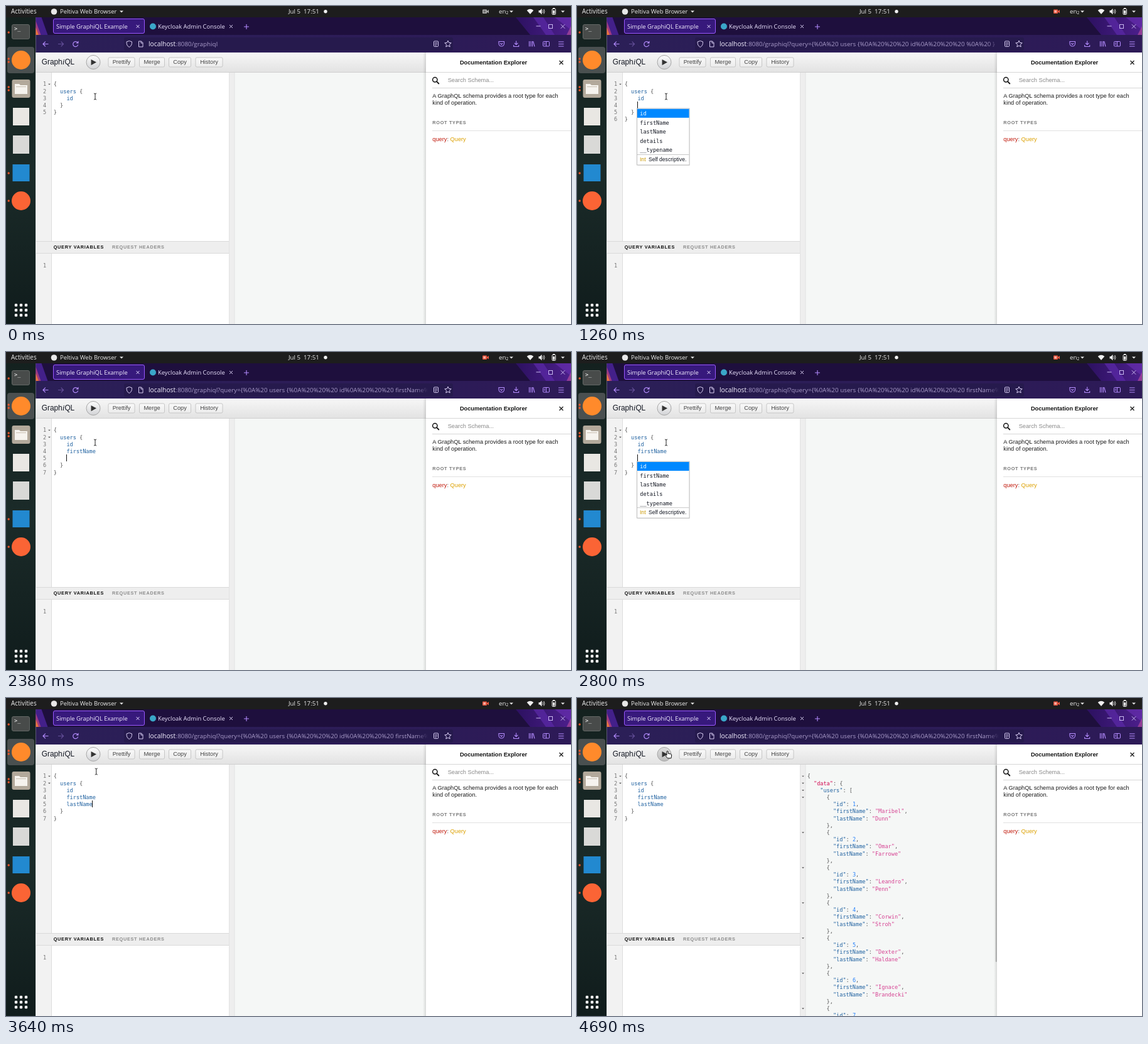
Write an HTML page that moves like this. It is 900 by 506 pixels and loops after 4760 ms.

```html
<!DOCTYPE html>
<html lang="en">
<head>
<meta charset="utf-8">
<title>GraphiQL</title>
<style>
html, body { margin: 0; width: 100%; height: 100%; overflow: hidden; background: #fff; }
svg { display: block; width: 900px; height: 506px; }
text { white-space: pre; }
.ui { font-family: "Open Sans", "Noto Sans", sans-serif; }
.web { font-family: "Liberation Sans", Arial, sans-serif; }
.code { font-family: "DejaVu Sans Mono", monospace; font-size: 8.57px; }
</style>
</head>
<body>
<svg id="stage" viewBox="0 0 900 506" xmlns="http://www.w3.org/2000/svg">
<defs>
  <linearGradient id="dock" x2="0" y2="1"><stop stop-color="#14211f"/><stop offset=".5" stop-color="#1b2b29"/><stop offset="1" stop-color="#101c1c"/></linearGradient>
  <linearGradient id="nav"><stop stop-color="#2b1f57"/><stop offset="1" stop-color="#2d1a57"/></linearGradient>
  <linearGradient id="glow"><stop stop-color="#2c1160"/><stop offset="1" stop-color="#4c1f8c"/></linearGradient>
  <linearGradient id="bar" x2="0" y2="1"><stop stop-color="#f7f7f7"/><stop offset="1" stop-color="#e2e2e2"/></linearGradient>
  <linearGradient id="btn" x2="0" y2="1"><stop stop-color="#f9f9f9"/><stop offset="1" stop-color="#ececec"/></linearGradient>
  <linearGradient id="run" x2="0" y2="1"><stop stop-color="#fdfdfd"/><stop offset="1" stop-color="#d2d3d6"/></linearGradient>
  <linearGradient id="runDown" x2="0" y2="1"><stop stop-color="#dedede"/><stop offset="1" stop-color="#bdbdbd"/></linearGradient>
  <linearGradient id="shade"><stop stop-color="#000" stop-opacity="0"/><stop offset="1" stop-color="#000" stop-opacity=".12"/></linearGradient>
  <linearGradient id="fade"><stop stop-color="#261a4d" stop-opacity="0"/><stop offset="1" stop-color="#261a4d"/></linearGradient>
  <clipPath id="urlClip"><rect x="220" y="48" width="452" height="24"/></clipPath>
</defs>
<g id="fixed"></g>
<g id="live"></g>
</svg>
<script>
const LOOP = 4760, STEP = 70, LINE = 11.2, CH = 5.16;
const $ = id => document.getElementById(id);

const rect = (x, y, w, h, fill, more = '') =>
  `<rect x="${x}" y="${y}" width="${w}" height="${h}" fill="${fill}" ${more}/>`;
const circle = (x, y, r, fill, more = '') =>
  `<circle cx="${x}" cy="${y}" r="${r}" fill="${fill}" ${more}/>`;
const fillPath = (d, fill, more = '') => `<path d="${d}" fill="${fill}" ${more}/>`;
const stroke = (d, color, w = 1, more = '') =>
  `<path d="${d}" fill="none" stroke="${color}" stroke-width="${w}" ${more}/>`;
const text = (cls, x, y, size, fill, s, more = '') =>
  `<text class="${cls}" x="${x}" y="${y}" font-size="${size}" fill="${fill}" ${more}>${s}</text>`;
const ui = (...a) => text('ui', ...a);
const web = (...a) => text('web', ...a);
const cross = (x, y, r, color, w) =>
  stroke(`M${x - r} ${y - r}l${2 * r} ${2 * r}m0 ${-2 * r}l${-2 * r} ${2 * r}`, color, w);
const down = (x, y, r, fill) => fillPath(`M${x - r} ${y - r / 2}h${2 * r}l${-r} ${r}z`, fill);

const row = i => 127.3 + LINE * i;
const fold = (x, i) => down(x, row(i) - 2.7, 1.9, '#555');

// Splits a line of code into coloured spans.
function code(x, i, line) {
  const spans = line.replace(/"data"|"\w+"(?=:)|"\w+"|\d+|[A-Za-z_]\w*|[^\w"]+/g, s => {
    const color = s === '"data"' ? '#d2054e'
      : /^"/.test(s) ? '#1f61a0'
      : /^\d/.test(s) ? '#2882f9'
      : /^\w/.test(s) ? '#1f61a0' : '#555';
    const value = /^"/.test(s) && !line.trim().startsWith(s);
    return `<tspan fill="${value ? '#d64292' : color}">${s}</tspan>`;
  });
  return `<text class="code" x="${x}" y="${row(i)}">${spans}</text>`;
}

function topBar() {
  let s = rect(0, 0, 900, 18, '#1d1d1d');
  s += ui(8, 12.4, 9.9, '#eee', 'Activities');
  s += circle(76.5, 9, 4.8, '#e8e8e8');
  s += ui(86, 12.4, 9.5, '#eee', 'Peltiva Web Browser') + down(184, 9, 3, '#e8e8e8');
  s += ui(450, 12.4, 9.7, '#eee', 'Jul 5  17:51') + circle(509, 8.7, 2.7, '#f2f2f2');
  s += ui(785, 12.4, 9.8, '#eee', 'en<tspan font-size="6.5" dy="1">2</tspan>');
  s += down(805, 9, 3, '#e8e8e8') + down(887, 9, 3, '#e8e8e8');
  s += fillPath('M835 13L829.7 7Q835 2.6 840.3 7z', '#f0f0f0');
  s += fillPath('M848.5 7h2l3-3v9.5l-3-3h-2z', '#f0f0f0');
  s += stroke('M855 6.5q1.5 2.2 0 4.5M856.7 5q2.6 3.7 0 7.5', '#ddd');
  s += rect(870, 4.5, 5.5, 9, 'none', 'rx="1" stroke="#f0f0f0"') + rect(871.2, 3, 3, 1.5, '#f0f0f0');
  s += rect(871.2, 7, 3, 5.5, '#f0f0f0');
  return s;
}

function dock() {
  let s = rect(0, 18, 47.5, 488, 'url(#dock)');
  s += rect(2, 65, 43, 42, '#4a5050', 'rx="4"');
  s += rect(9.5, 29.5, 28, 23, '#484b4a', 'rx="2.5" stroke="#636765"');
  s += text('code', 13, 38.5, 8, '#fff', '&gt;_');
  s += circle(24, 86, 15, '#ff8a2b');
  s += rect(9.5, 117, 29, 29, '#b3a99b', 'rx="3"');
  s += fillPath('M14 124h7l2 2h11v14h-20z', '#f6f3ee') + stroke('M16 128.5h16', '#c9bfb2');
  s += rect(11, 162, 26, 28, '#e9e7e3');
  s += rect(11, 206, 26, 29, '#d9d9d7');
  s += rect(10.5, 252, 27, 27, '#2289d0');
  s += circle(24, 310, 15, '#fb6435');
  for (const y of [42, 84, 89, 129, 134, 266, 310]) s += circle(4.2, y, 1.7, '#e8542a');
  for (let i = 0; i < 9; i++)
    s += rect(13.8 + i % 3 * 8, 473.8 + (i / 3 | 0) * 8, 4.4, 4.4, '#f2f2f2', 'rx="1.2"');
  return s;
}

function browser() {
  const pale = '#c9b8f0', pink = '#b48cff';
  let s = rect(47.5, 18, 852.5, 28, '#1e0f3d');
  s += fillPath('M47.5 18h9l10 28h-19z', '#43208a') + fillPath('M47.5 24l8 22h-8z', '#a03c80');
  s += fillPath('M47.5 34l4.5 12h-4.5z', '#e8763c');
  s += fillPath('M812 18h88v28h-65z', 'url(#glow)');
  s += fillPath('M840 18h16l18 28h-14z', '#5c2aa8', 'opacity=".7"');
  s += fillPath('M874 18h26v20z', '#6b30b4', 'opacity=".6"');
  s += fillPath('M900 32v14h-7z', '#b04a9c', 'opacity=".7"');
  s += rect(75.5, 20.5, 145, 23, '#37197c', 'rx="2.5" stroke="#9a59ff"');
  s += ui(80, 36.3, 9.4, '#f4efff', 'Simple GraphiQL Example') + cross(210, 32.5, 2.4, '#e6dcff', 1);
  s += circle(234, 32.5, 5, '#3aa6c8');
  s += ui(242, 36.3, 9.4, '#ece4ff', 'Keycloak Admin Console') + cross(358.5, 32.5, 2.4, '#e6dcff', 1);
  s += stroke('M379 33h8m-4-4v8', pink, 1.1);
  s += stroke('M844.5 32h7', pale) + rect(864.5, 29.5, 6, 6, 'none', `stroke="${pale}"`);
  s += cross(887, 32.5, 3.2, pale, 1);

  s += rect(47.5, 46, 852.5, 28, 'url(#nav)') + rect(188, 50, 524, 21, '#261a4d', 'rx="3"');
  s += stroke('M67.5 60.5h-8.5m3.8-3.8l-3.8 3.8 3.8 3.8', pink, 1.2);
  s += stroke('M83 60.5h8.5m-3.8-3.8l3.8 3.8-3.8 3.8', '#65509a', 1.2);
  s += stroke('M114 58.3a4 4 0 1 0 .7 3.3', pink, 1.2) + fillPath('M115.5 55.5v4h-4z', pink);
  s += stroke('M196.3 55.5l4.2 1.4c.3 4-1 7-4.2 8.6-3.2-1.6-4.5-4.6-4.2-8.6z', '#d8cdf3');
  s += stroke('M211.5 56h4l2.5 2.5v6.5h-6.5zM215 56v3h3', '#d8cdf3');
  s += rect(681.5, 56, 7, 8.5, 'none', 'rx="1" stroke="#d8cdf3"') + stroke('M683 58.5h4m-4 2h4m-4 2h3', '#d8cdf3', .8);
  s += stroke('M704 55l1.5 3.4 3.7.4-2.8 2.5.8 3.7-3.2-1.9-3.2 1.9.8-3.7-2.8-2.5 3.7-.4z', '#d8cdf3');
  s += stroke('M785 56.5h8.5v3.3a4.25 4.25 0 0 1-8.5 0zM787.2 59.2l2 2 2-2', pink, 1.1);
  s += stroke('M812.7 55.5v6m-2.8-2.7l2.8 2.7 2.8-2.7M808.7 62v2.5h8V62', pink, 1.1);
  s += stroke('M833.5 56v8.5m2.5-8.5v8.5m2.5-8.5v8.5m1.2-8.3l2.3 8.3', pink, 1.1);
  s += rect(855.5, 56.5, 10, 7.5, 'none', `rx="1" stroke="${pink}"`) + stroke('M860.5 56.5v7.5m-3.5-5h2m-2 2h2', pink);
  s += stroke('M880 57h8.5m-8.5 3.5h8.5m-8.5 3.5h8.5', pink, 1.1);
  return s;
}

function page() {
  const edge = '#dadada';
  let s = rect(47.5, 74, 852.5, 432, '#fff');
  s += rect(364, 106, 305, 400, '#f5f7f6') + rect(355, 106, 9, 400, '#eee');
  s += stroke('M355.5 106v400M364 106v400', '#e2e2e2');
  s += rect(47.5, 106, 25.5, 400, '#f2f2f2') + stroke('M72.5 106v400', '#ddd');
  s += rect(47.5, 74, 621.5, 32, 'url(#bar)') + stroke('M47.5 105.5h621.5', '#d0d0d0');
  s += web(56.7, 93.3, 11.9, '#141823', 'Graph<tspan font-style="italic" font-family="Liberation Serif, serif" font-size="13">i</tspan>QL');
  [['Prettify', 163, 42], ['Merge', 212.5, 40], ['Copy', 259.5, 35], ['History', 302, 43]].forEach(([label, x, w]) => {
    s += rect(x, 82, w, 15, 'url(#btn)', 'rx="2" stroke="#c6c6c6"');
    s += web(x + w / 2, 92, 9.24, '#444', label, 'text-anchor="middle"');
  });
  s += rect(47.5, 374, 307.5, 20, '#eee') + stroke('M47.5 374.5h307.5M47.5 393.5h307.5', edge);
  s += web(75.7, 386.2, 7.3, '#111', 'QUERY VARIABLES', 'font-weight="bold" letter-spacing=".74"');
  s += web(169, 386.2, 7.3, '#8c8c8c', 'REQUEST HEADERS', 'font-weight="bold" letter-spacing=".7"');
  s += text('code', 59, 415.9, 8.57, '#777', '1');
  return s;
}

function docs() {
  let s = rect(664, 74, 5, 432, 'url(#shade)') + rect(669, 74, 231, 432, '#fff');
  s += stroke('M669 105.5h231M679 130.5h221', '#d6d6d6') + stroke('M679 198.5h221', '#e0e0e0');
  s += web(776.5, 93.2, 9.24, '#141414', 'Documentation Explorer', 'font-weight="bold" text-anchor="middle"');
  s += cross(884.5, 90, 3, '#222', 1.4);
  s += circle(683.3, 117.3, 3.7, 'none', 'stroke="#111" stroke-width="1.5"') + stroke('M686 120.2l3.8 3.8', '#111', 1.8);
  s += web(703.7, 121.3, 9.24, '#8a8a8a', 'Search Schema...');
  s += web(679.3, 146, 9.24, '#1c1c1c', 'A GraphQL schema provides a root type for each');
  s += web(679.3, 157.2, 9.24, '#1c1c1c', 'kind of operation.');
  s += web(679.3, 188.2, 7.3, '#777', 'ROOT TYPES', 'font-weight="bold" letter-spacing=".7"');
  s += web(679.3, 215, 9.24, '#c0180a', 'query<tspan fill="#555">:</tspan> <tspan fill="#dca000">Query</tspan>');
  return s;
}

const people = ['Maribel Dunn', 'Omar Farrowe', 'Leandro Penn', 'Corwin Stroh',
  'Dexter Haldane', 'Ignace Brandecki', 'Tamsin Orrell'];

function results() {
  const lines = ['{', '  "data": {', '    "users": ['];
  people.forEach((p, i) => {
    const [first, last] = p.split(' ');
    lines.push('      {', `        "id": ${i + 1},`, `        "firstName": "${first}",`,
      `        "lastName": "${last}"`, '      },');
  });
  return lines.slice(0, 35).map((l, i) => code(366.7, i, l)).join('');
}
const resultLines = results();
const resultFolds = [0, 1, 2, ...people.map((_, i) => 3 + 5 * i)].map(i => fold(360, i)).join('');

const fields = ['id', 'firstName', 'lastName', 'details', '__typename'];

function popup(line, pick) {
  const x = 96, y = 163.5 + LINE * (line - 3), type = pick ? 'String' : 'Int';
  const w = pick ? 95.5 : 82.5, h = 89, rowH = 14.6;
  let s = rect(x + 1, y + 1.5, w, h, '#000', 'opacity=".1"') + rect(x - .5, y - .5, w + 1, h + 1, '#fff', 'stroke="#bbb"');
  s += rect(x, y + .3 + pick * rowH, w, 14, '#08f');
  fields.forEach((f, i) => {
    s += text('code', x + 4.3, y + 10.4 + i * rowH, 8.57, i === pick ? '#fff' : '#141823', f);
  });
  s += stroke(`M${x} ${y + 73}h${w}`, '#c8c8c8');
  s += web(x + 4, y + 83, 8.55, '#ca9800', type) + web(x + (pick ? 31 : 18), y + 83, 8.55, '#141823', 'Self descriptive.');
  return s;
}

// Moments of the session, in ms.
const T = { record: 140, enter: 350, url1: 910, open1: 980, pick1: 1540, accept1: 1820, enter2: 2100,
  url2: 2310, open2: 2660, pick2: 2870, pick3: 3080, accept2: 3360, move: 3500, click: 3850, data: 3990, folds: 4620 };
const keys = [T.enter, T.open1, T.pick1, T.accept1, T.enter2, T.open2, T.pick2, T.pick3, T.accept2];

function url(t) {
  let tail = ':8080/graphiql';
  if (t >= T.url1) {
    const gap = '%0A%20%20%20 ';
    tail += `?query={%0A%20 users {${gap}id${gap}` + (t < T.url2 ? '%0A%20 }' : 'firstName%0A');
  }
  return `<g clip-path="url(#urlClip)">${ui(227, 64, 10.3, '#f4efff', 'localhost')}${ui(270.6, 64, 9.85, '#a99bc9', tail)}</g>`
    + (t >= T.url1 ? rect(654, 51, 18, 19, 'url(#fade)') : '');
}

function editor(t) {
  const body = ['    id'];
  if (t >= T.enter) body.push(t < T.accept1 ? '    ' : '    firstName');
  if (t >= T.enter2) body.push(t < T.accept2 ? '    ' : '    lastName');
  const lines = ['{', '  users {', ...body, '  }', '}'];
  let s = fold(69, 0) + (t >= T.url2 ? fold(69, 1) : '');
  lines.forEach((l, i) => {
    s += text('code', 59, row(i), 8.57, '#777', i + 1) + code(75.8, i, l);
  });
  const last = keys.filter(k => k <= t).pop();
  if (last !== undefined && t < T.click && (t - last) % 1060 < 530) {
    const x = Math.floor(75.8 + body[body.length - 1].length * CH);
    s += rect(x, Math.floor(row(body.length + 1) - 8.3), 1, 11, '#111');
  }
  if (t >= T.open1 && t < T.accept1) s += popup(3, t < T.pick1 ? 0 : 1);
  if (t >= T.open2 && t < T.accept2) s += popup(4, t < T.pick2 ? 0 : t < T.pick3 ? 1 : 2);
  return s;
}

function pointer(t) {
  const p = Math.min(1, Math.max(0, (t - T.move) / 280)), e = p * p * (3 - 2 * p);
  const x = 142 + 3.5 * e, y = 144 - 54 * e;
  if (y > 101) {
    const d = `M${x - 2} ${y - 5}q2 0 2 1.5v7q0 1.5-2 1.5m4-10q-2 0-2 1.5m0 7q0 1.5 2 1.5`;
    return stroke(d, '#fff', 2, 'opacity=".7"') + stroke(d, '#222', 1);
  }
  return fillPath(`M${x - 2.5} ${y - 5}q1.2-1.2 2.2 0v3.3l4.3.9q1.3.4 1.2 1.8l-.7 4.8h-5.8l-3.4-4.3q.2-1.6 2.2-.3z`,
    '#fff', 'stroke="#111" stroke-linejoin="round"');
}

function draw(t) {
  const red = t >= T.record, cam = red ? '#e8553f' : '#a8a8a8';
  let s = rect(759, 5.5, 7, 6.5, cam, 'rx="1"') + fillPath('M766 8l3-2v5.5l-3-2z', cam);
  s += rect(760.5, 7, 3.5, 3.5, red ? '#fff' : '#444', 'opacity=".55"');
  s += url(t);
  s += circle(139, 89.5, 11, t >= T.click ? 'url(#runDown)' : 'url(#run)', 'stroke="#a5a5a5"');
  s += fillPath('M135.5 85l8.5 4.6-8.5 4.6z', '#333');
  s += editor(t);
  if (t >= T.data) {
    const dim = Math.min(1, Math.max(0, (t - 4340) / 350));
    s += resultLines + rect(666.7, 107, 2.3, 313, '#555', `rx="1" opacity="${1 - .65 * dim}"`);
  }
  if (t >= T.folds) s += resultFolds;
  $('live').innerHTML = s + pointer(t);
}

$('fixed').innerHTML = topBar() + dock() + browser() + page() + docs();

let shown = -1;
function tick() {
  const t = Math.floor(performance.now() % LOOP / STEP) * STEP;
  if (t !== shown) draw(shown = t);
  requestAnimationFrame(tick);
}
tick();
</script>
</body>
</html>
```
